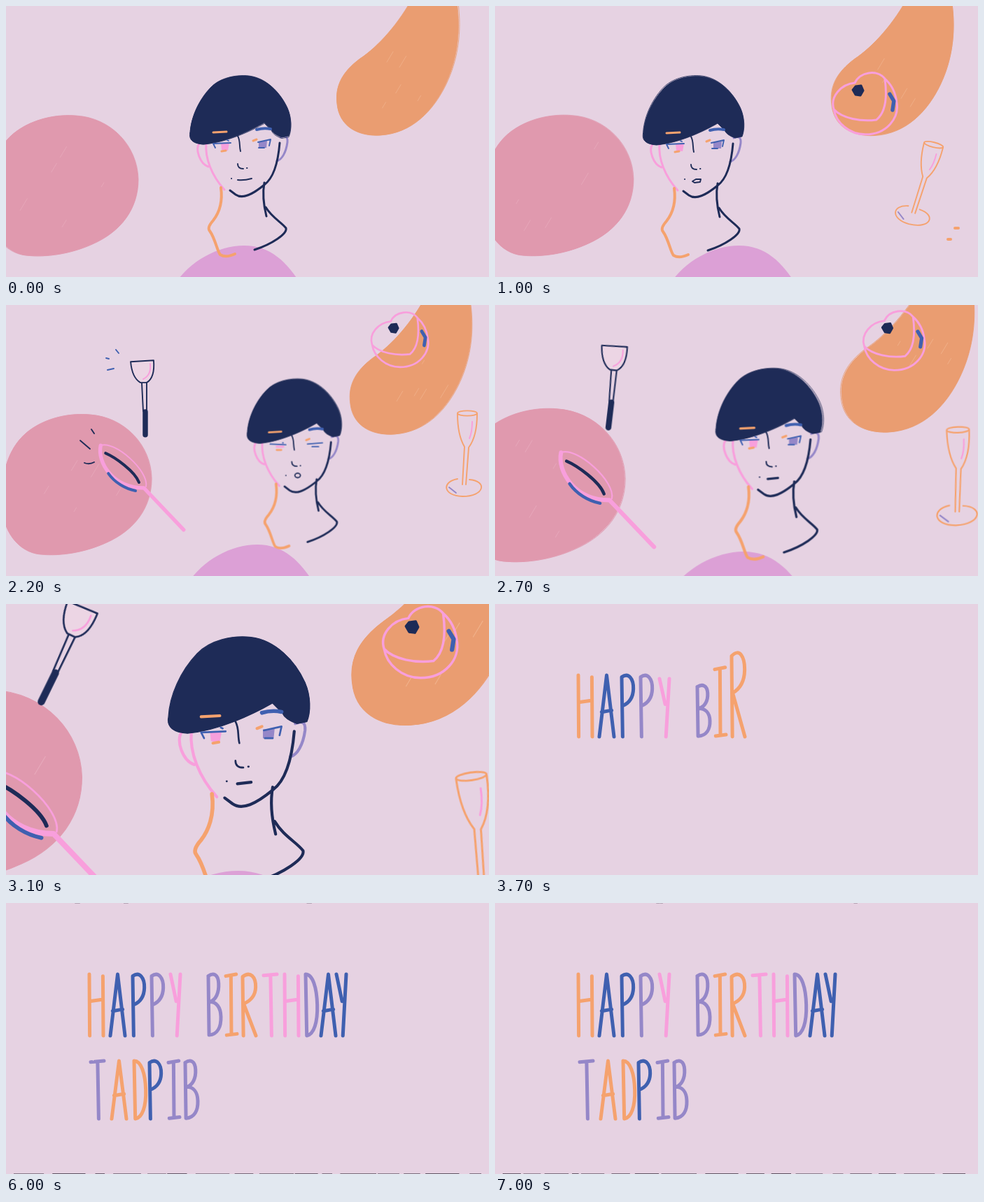
An HTML page for the animation above (7100 ms loop, 690 by 388 pixels).

```html
<!DOCTYPE html>
<html lang="en">
<head>
<meta charset="utf-8">
<title>Happy birthday</title>
<style>
html, body { margin: 0; width: 100%; height: 100%; overflow: hidden; background: #e6d2e2; }
svg { display: block; width: 690px; height: 388px; }
path, ellipse { fill: none; stroke-linecap: round; stroke-linejoin: round; stroke-width: 3; }
use { fill: none; stroke-width: .8; }
.shape { fill: inherit; stroke-width: inherit; }
.navy { stroke: #1e2b57; }
.blue { stroke: #3f60b0; }
.lav { stroke: #9587c8; }
.pink { stroke: #f89fdc; }
.orange { stroke: #f5a26e; }
.fine { stroke-width: 1.9; }
.bold { stroke-width: 4; }
.thick { stroke-width: 5.4; }
.handle { stroke-width: 7.5; }
.scratch { stroke-width: .8; opacity: .65; }
.glyph { stroke-width: 5; vector-effect: non-scaling-stroke; }
.ink { fill: #1e2b57; stroke: #1e2b57; }
.peach { fill: #ea9d71; stroke: #ea9d71; }
.rose { fill: #e099ae; stroke: #e099ae; }
.rim { fill: none; }
</style>
</head>
<body>
<svg viewBox="0 0 690 388">
  <defs>
    <filter id="rough" filterUnits="userSpaceOnUse" x="0" y="0" width="690" height="388" color-interpolation-filters="sRGB">
      <feTurbulence id="noise" type="fractalNoise" baseFrequency=".06" numOctaves="1" seed="1"/>
      <feDisplacementMap in="SourceGraphic" scale="1.5" xChannelSelector="R" yChannelSelector="G"/>
    </filter>
    <path id="orangeShape" class="shape" d="M582 -14C562 24 532 58 505 76C480 95 470 115 473 140C476 172 502 187 535 185C580 182 610 150 628 112C645 76 650 36 644 -6C636 -46 602 -48 582 -14Z"/>
    <path id="pinkShape" class="shape" d="M-25 280C-25 230 -10 195 20 176C45 160 75 155 100 157C150 160 188 200 189 248C189 290 165 322 125 340C95 354 60 360 30 357C0 354 -25 325 -25 280Z"/>
    <path id="hairShape" class="shape" d="M263 182C264 160 275 135 292 117C305 103 328 98 347 100C372 103 392 124 402 146C408 160 408 176 404 186L394 188Q382 184 379 177L369 167C350 178 315 195 282 198C268 197 261 192 263 182Z"/>
  </defs>
  <g filter="url(#rough)">
    <g id="scene">
      <g id="pinkBlob">
        <use href="#pinkShape" class="rose"/>
        <use href="#pinkShape" class="rose rim" id="pinkRim"/>
        <path id="pinkScratch" class="scratch" stroke="#ecb4c4"/>
      </g>
      <g id="orangeBlob">
        <use href="#orangeShape" class="peach"/>
        <use href="#orangeShape" class="peach rim" id="orangeRim"/>
        <path id="orangeScratch" class="scratch" stroke="#f4bd9a"/>
      </g>
      <g id="bump"><path style="fill:#dca0d6" d="M240 400C262 365 303 343 340 343C378 343 402 367 422 400Z"/></g>
      <g id="pot">
        <path class="pink" d="M484 148C478 130 494 112 514 110C521 94 546 90 557 104C560 126 560 151 545 163C523 166 496 161 484 148C487 167 506 184 529 184C560 184 578 160 574 138C572 121 565 111 557 104"/>
        <path class="ink" d="M511 120L515 115L523 114L526 121L522 128L515 127Z"/>
        <path class="blue thick" d="M564 126L570 136L568 149"/>
      </g>
      <g id="glass">
        <ellipse class="orange fine" cx="659" cy="155" rx="14" ry="3.6"/>
        <path class="orange fine" d="M645 156Q645 186 655 203L652 257M673 156Q673 188 661 204L657 257M645 249C622 253 624 273 652 274C684 274 688 252 662 250"/>
        <path class="pink fine" d="M666 167Q666 182 662 191"/>
        <path class="lav fine" d="M633 261L643 269"/>
      </g>
      <path id="drops" class="orange bold" d="M657 318L662 318M647 334L651 334"/>
      <g id="spatula">
        <path class="navy fine" style="fill:#ecd5e4" d="M178 81L211 79Q213 104 201 111L192 111Q180 104 178 81Z"/>
        <path class="navy fine" d="M194 112L196 152M201 111L201 152"/>
        <path class="navy handle" d="M199 153L199 186"/>
        <path class="pink fine" d="M206 84Q208 100 196 106"/>
      </g>
      <g id="spoon">
        <path class="pink thick" d="M135 201C130 225 152 262 197 262L254 322"/>
        <path class="pink fine" d="M135 201C155 193 205 238 200 260"/>
        <path class="navy bold" d="M142 212C156 218 184 238 190 254"/>
        <path class="blue bold" d="M146 241C155 254 170 263 185 266"/>
      </g>
      <g id="clinks">
        <path class="blue fine" d="M157 64L161 69M143 76L147 77M145 93L154 91"/>
        <path class="navy fine" d="M122 178L126 184M106 194L120 206M112 226Q119 229 126 225"/>
      </g>
      <g id="head">
        <path class="pink" d="M276 197C270 205 277 226 289 230M286 196C284 218 294 243 312 263"/>
        <path class="lav" d="M392 188Q403 183 402 195C400 210 394 220 387 222"/>
        <path class="orange bold" d="M307 260C310 282 303 298 296 307Q287 317 291 322C299 333 302 352 306 356Q314 361 327 355"/>
        <path class="navy" d="M391 196C389 220 384 245 369 256C352 270 338 277 328 270L320 264M369 253C366 270 368 285 372 301M371 288C380 303 393 309 400 318C402 326 380 341 355 349"/>
        <use href="#hairShape" class="ink"/>
        <use href="#hairShape" class="ink rim" id="hairRim"/>
        <path class="orange" d="M296 181L315 180"/>
        <path class="blue bold" d="M358 177Q368 174 378 176"/>
        <path class="orange" d="M353 193L358 191"/>
        <path class="navy fine" d="M331 186C335 193 333 200 335 208M331 226Q331 233 339 233M344 232L344.5 232M322 247L322.2 247"/>
        <g id="openEyes">
          <g id="iris">
            <path style="fill:#f89fdc" d="M307 196L319 196L317 207L308 206Z"/>
            <path style="fill:#9587c8" d="M361 194L373 193L372 203L361 203Z"/>
          </g>
          <path class="blue fine" d="M299 203L296 197L321 196M316 192L318 193M360 195L378 191L376 200M361 203L369 203"/>
          <path class="orange" d="M308 208L314 207"/>
        </g>
        <g id="lowEyes">
          <path class="pink" d="M308 203L318 203"/>
          <path class="blue fine" d="M298 199L322 200M317 197L318 197M355 199L378 197M362 203L372 203"/>
          <path class="orange" d="M308 208L315 208"/>
        </g>
        <path id="mouthLine" class="navy fine" d="M331 249Q340 250 351 247"/>
        <path id="mouthAjar" class="navy fine" d="M333 250L338 247L345 247L344 251L336 252Z"/>
        <ellipse id="mouthOh" class="navy fine" cx="340" cy="247" rx="4.2" ry="3.4"/>
        <path id="mouthWide" class="navy" d="M333 249.5L347 248"/>
      </g>
    </g>
    <g id="words" role="img" aria-label="HAPPY BIRTHDAY TADPIB"></g>
  </g>
  <path id="edge" stroke="#4a4150" style="stroke-width:1;stroke-linecap:butt"/>
</svg>
<script>
const LOOP = 7100, STEP = 100, CUT = 3200;
const DRIFT = 8.5 / 1000;
const beats = { left: [300, 800], right: [1400, 1900], close: [2500, 3100] };

const $ = id => document.getElementById(id);
const show = (id, on) => { $(id).style.display = on ? '' : 'none'; };
const mix = (a, b, u) => a + (b - a) * u;

function progress(t, [from, to]) {
  const u = Math.min(1, Math.max(0, (t - from) / (to - from)));
  return u * u * (3 - 2 * u);
}

function random(seed) {
  let s = seed * 7919 + 17;
  return () => (s = (s * 16807) % 2147483647) / 2147483647;
}

// A pose is [dx, dy, scale, rotation] about a pivot; parts ease from beat to beat
const home = [0, 0, 1, 0];
const parts = [];
const part = (id, px, py, moves) => parts.push({ el: $(id), px, py, moves });

part('pinkBlob', 82, 257, { drift: DRIFT, close: [-118, 3, 1.35, 0] });
part('orangeBlob', 560, 90, { drift: DRIFT, close: [52, -45, 1.35, 0] });
part('bump', 331, 343, { drift: DRIFT, close: [-11, 39, 1.3, 0] });
part('head', 334, 200, { left: [-51, 1, 1, 0], right: [77, 0, .935, 0], close: [-2, -12, 1.4, 0] });
part('pot', 528, 140, { born: 600, right: [34, -90, .885, 0], close: [63, -85, 1.155, 0] });
part('glass', 655, 208, { born: 600, left: [-45, 41, 1, 14], right: home, close: [15, 122, 1.57, -8] });
part('spatula', 197, 135, { born: 1700, close: [-118, -60, 1.39, 26] });
part('spoon', 197, 262, { born: 1800, close: [-129, 67, 1.45, 0] });

const grow = age => age <= 0 ? 0 : 1 - Math.exp(-age / 90) * Math.cos(age / 80);

function place({ el, px, py, moves }, t) {
  let pose = [(moves.drift || 0) * t, 0, 1, 0];
  for (const name in beats) {
    const u = progress(t, beats[name]);
    if (moves[name]) pose = pose.map((v, i) => mix(v, moves[name][i], u));
  }
  const [dx, dy, s, r] = pose;
  const size = s * ('born' in moves ? grow(t - moves.born) : 1);
  el.style.display = size > 0 ? '' : 'none';
  el.setAttribute('transform', `translate(${px + dx} ${py + dy}) rotate(${r}) scale(${size}) translate(${-px} ${-py})`);
}

function scratches(id, rnd, cx, cy, spread) {
  let d = '';
  for (let i = 0; i < 5; i++) {
    const n = 5 + rnd() * 14;
    d += `M${cx + (rnd() - .5) * spread} ${cy + (rnd() - .5) * spread}l${-n * .6} ${n}`;
  }
  $(id).setAttribute('d', d);
}

function wobble(id, rnd, px, py) {
  $(id).setAttribute('transform', `translate(${rnd() * 4 - 2} ${rnd() * 2 - 1}) rotate(${rnd() * 2 - 1} ${px} ${py})`);
}

function drawScene(t, rnd) {
  parts.forEach(p => place(p, t));
  const low = t >= 1900 && t < 2500;
  show('openEyes', !low);
  show('lowEyes', low);
  show('mouthLine', t < 700);
  show('mouthAjar', t >= 700 && t < 1600);
  show('mouthOh', t >= 1600 && t < 2600);
  show('mouthWide', t >= 2600);
  show('drops', t >= 900 && t < 1300);
  show('clinks', t >= 2000 && t < 2500);
  const glance = 2 * progress(t, beats.left) - 4 * progress(t, beats.close);
  $('iris').setAttribute('transform', `translate(${glance})`);
  scratches('pinkScratch', rnd, 90, 255, 130);
  scratches('orangeScratch', rnd, 575, 100, 85);
  wobble('pinkRim', rnd, 82, 257);
  wobble('orangeRim', rnd, 560, 90);
  wobble('hairRim', rnd, 334, 150);
}

// Hand lettering: width, space after, strokes on a 100 x 100 box
const glyphs = {
  H: [20, 10, 'M0 0L3 100M97 3L100 100M2 44L98 41'],
  A: [21, 11, 'M0 100L50 0L100 100M16 60L84 57'],
  P: [17, 10, 'M8 100L0 3C60 -5 100 6 98 22S55 46 6 50'],
  Y: [14, 0, 'M0 0L58 44M100 0L66 100'],
  B: [18, 7, 'M0 3L6 99C75 98 102 85 100 69S62 45 12 45C60 42 86 30 82 15S40 -3 0 3'],
  I: [16, 8, 'M0 3L92 0M46 2L50 98M8 99L100 97'],
  R: [19, 11, 'M6 100L0 4C60 -6 100 5 98 21S52 44 8 48L100 100'],
  T: [19, 11, 'M0 2L100 0M52 2L60 100'],
  D: [17, 5, 'M0 0L10 100C70 98 102 78 98 50S60 0 0 0Z']
};
const WORD_SPACE = 40, KERN_AY = -10;
const hues = { o: 'orange', b: 'blue', l: 'lav', p: 'pink' };
const letters = [];

function line(x, y, height, text, colours) {
  [...text].forEach((ch, i) => {
    if (ch === ' ') return void (x += WORD_SPACE);
    const [w, gap, d] = glyphs[ch];
    if (text.slice(i - 1, i + 1) === 'AY') x += KERN_AY;
    const g = document.createElementNS('http://www.w3.org/2000/svg', 'g');
    g.innerHTML = `<path class="glyph ${hues[colours[i]]}" transform="translate(${x} ${-height}) scale(${w / 100} ${height / 100})" d="${d}"/>`;
    $('words').append(g);
    letters.push({ g, base: y + height });
    x += w + gap;
  });
}
line(119, 102, 88, 'HAPPY BIRTHDAY', 'obblp loopplbb');
line(121, 226, 83, 'TADPIB', 'loobll');

// Letters stretch up, squash and settle
const bounce = age => age < 260 ? 1 + .55 * Math.exp(-age / 160) * Math.sin(age / 260 * 2 * Math.PI) : 1;

function drawWords(t) {
  letters.forEach(({ g, base }, i) => {
    const age = t - CUT - i * 65;
    g.style.display = age < 0 ? 'none' : '';
    g.setAttribute('transform', `translate(0 ${base}) scale(1 ${bounce(age)})`);
  });
}

// Broken dark line along the lower border, with a few specks on top
function drawEdge(t, rnd) {
  const [from, to] = t < 4800 ? [300, 395] : [11, 679];
  let d = '';
  for (let x = from; x < to;) {
    const n = Math.min(8 + rnd() * 45, to - x);
    d += `M${x} ${387.6 + rnd() * .4}h${n}`;
    x += n + 1 + rnd() * 14;
  }
  for (let i = 0; i < 3; i++) d += `M${20 + rnd() * 640} -.2h${3 + rnd() * 5}`;
  $('edge').setAttribute('d', d);
}

function render(n) {
  const t = n * STEP, rnd = random(n + 1), intro = t < CUT;
  show('scene', intro);
  show('words', !intro);
  show('edge', t >= 4100);
  $('noise').setAttribute('seed', 1 + n % 4);
  if (intro) return drawScene(t, rnd);
  drawWords(t);
  drawEdge(t, rnd);
}

const start = performance.now();
let last = -1;
function tick() {
  const ms = Math.max(0, performance.now() - start) % LOOP;
  const n = Math.floor(ms / STEP);
  if (n !== last) render(n);
  last = n;
  requestAnimationFrame(tick);
}
tick();
</script>
</body>
</html>
```
